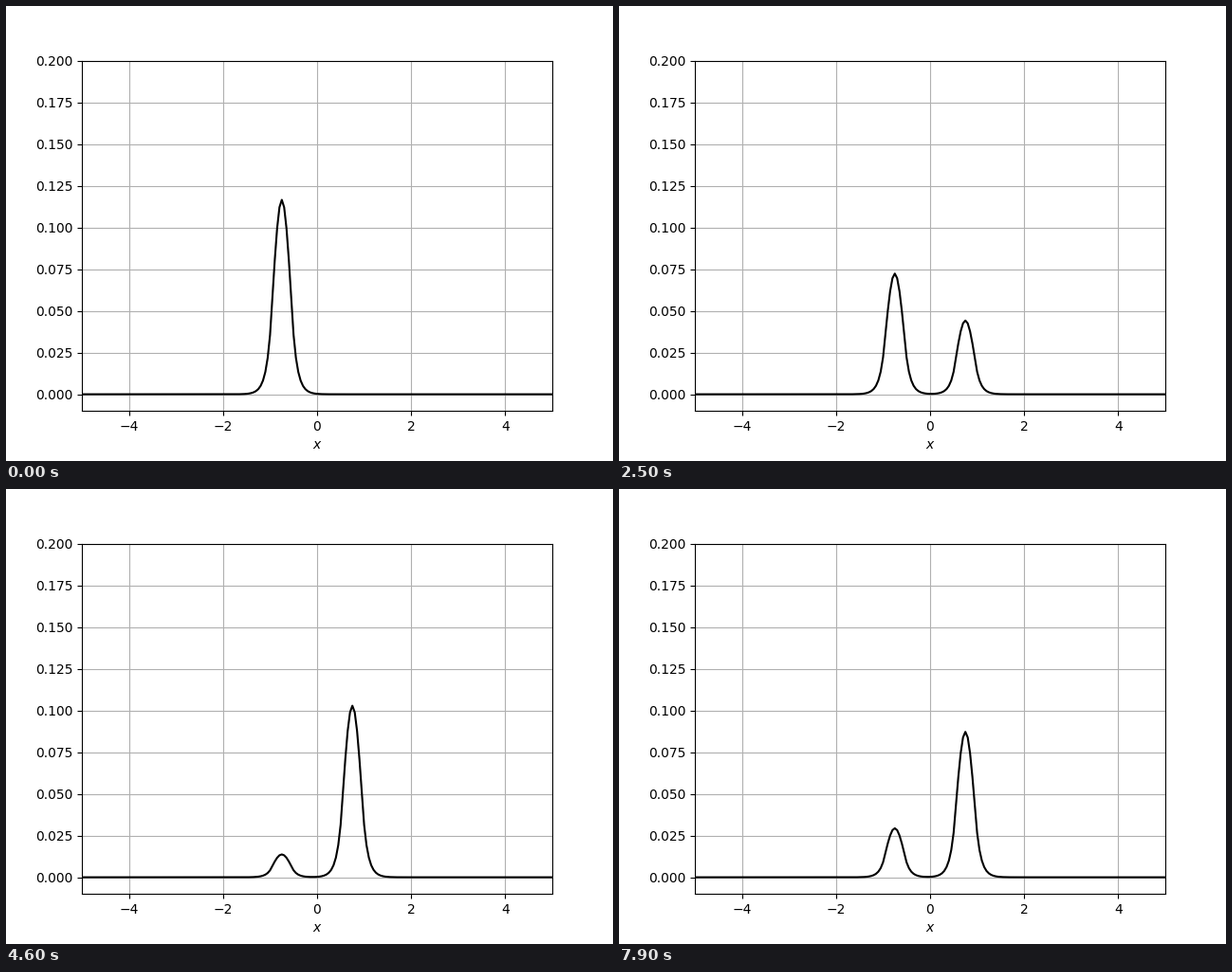
Recreate the animation shown at these times as a matplotlib script. Size 640 px wide and 480 px high, loop 8000 ms.

```python
import numpy as np
import matplotlib.pyplot as plt
from matplotlib.animation import FuncAnimation

FRAMES = 80
INTERVAL = 100      # ms
BEAT = 0.05308      # phase between the two lowest states, per frame
DEPTH = 19.7

# Double square well on a grid, solved by finite differences
n = 201
x = np.linspace(-5, 5, n)
dx = x[1] - x[0]
inside = np.abs(np.abs(x) - 0.75) < 0.225
potential = np.where(inside, 0.0, DEPTH)
hop = np.full(n - 1, -0.5 / dx**2)
H = np.diag(potential + 1 / dx**2) + np.diag(hop, 1) + np.diag(hop, -1)
states = np.linalg.eigh(H)[1]

# Fix signs so that even + odd sits in the left well
left = np.argmin(np.abs(x + 0.75))
even, odd = (states[:, k] * np.sign(states[left, k]) for k in (0, 1))


def density(i):
    return (even**2 + odd**2) / 2 + even * odd * np.cos(BEAT * i)


fig, ax = plt.subplots(figsize=(6.4, 4.8), dpi=100)
ax.set_xlim(-5, 5)
ax.set_ylim(-0.01, 0.2)
ax.set_xlabel(r"$x$")
ax.grid()
line, = ax.plot(x, density(0), color="black", lw=1.5)


def update(i):
    line.set_ydata(density(i))
    return line,


anim = FuncAnimation(fig, update, frames=FRAMES, interval=INTERVAL,
                     repeat=True, repeat_delay=0)
plt.show()
```
